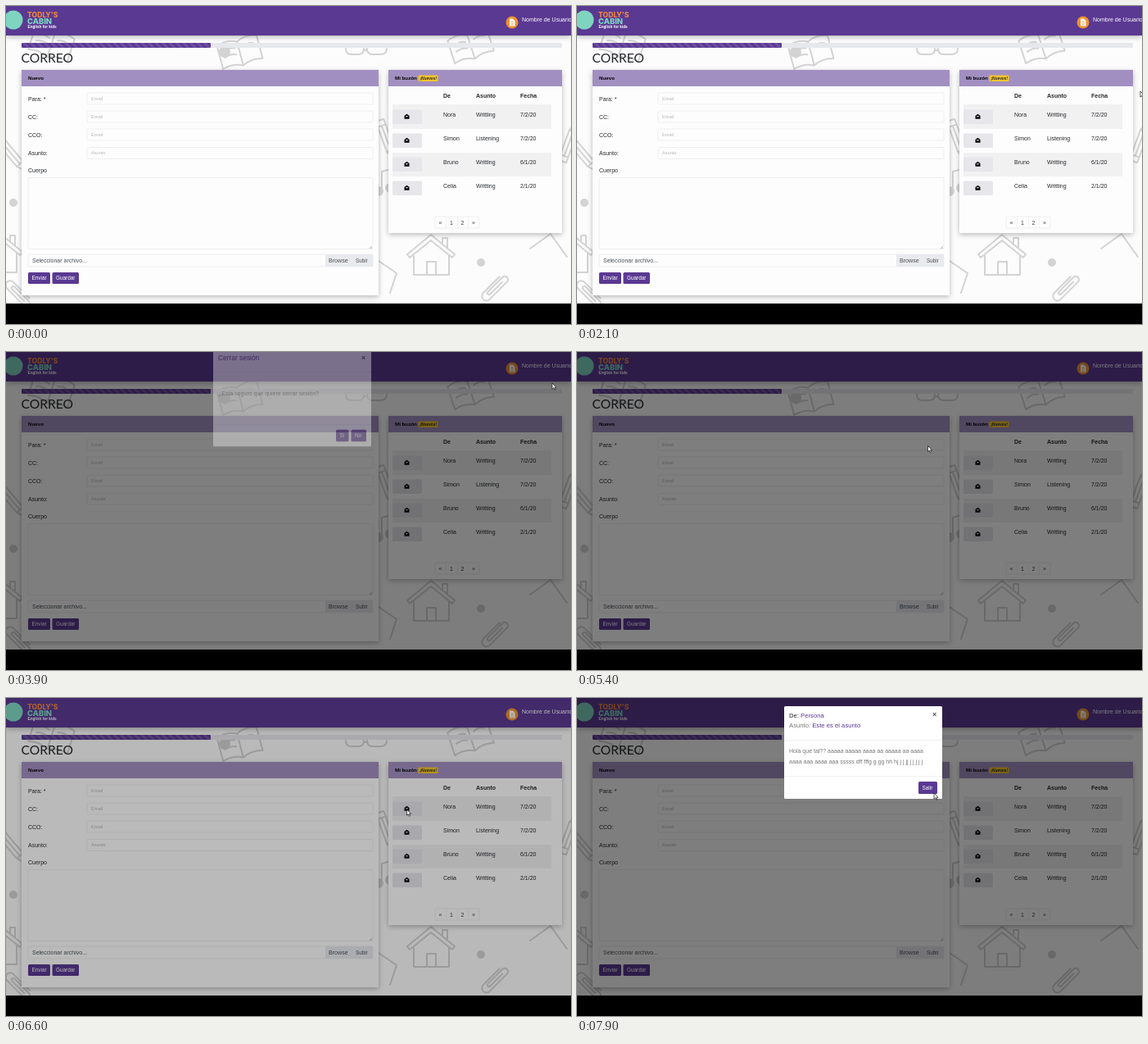
Write an HTML page that moves like this. It is 690x388 px and loops after 8 s.

```html
<!DOCTYPE html>
<html lang="es">
<head>
<meta charset="utf-8">
<title>Correo</title>
<style>
  html, body { margin: 0; width: 100%; height: 100%; overflow: hidden; background: #000; }
  svg { display: block; width: 690px; height: 388px; }
  text { font-family: "Liberation Sans", Arial, sans-serif; white-space: pre; }
  .b { font-weight: bold; }
  .i { font-weight: bold; font-style: italic; }
  .title { font-family: Lato, sans-serif; }
  .brand { font-family: Inter, sans-serif; font-weight: 800; }
  .card { filter: drop-shadow(0 2px 3px #0004); }
  .doodle { fill: none; stroke: #d3d3d3; stroke-width: 2; stroke-linejoin: round; stroke-linecap: round; }
</style>
</head>
<body>
<svg id="stage" viewBox="0 0 690 388"></svg>
<script>
const PURPLE = '#5a3992', INK = '#25282c';

// Text is placed by its left edge and vertical middle.
const text = (x, y, s, size = 7, fill = INK, cls = '') =>
  `<text x="${x}" y="${y + size * .36}" font-size="${size}" fill="${fill}" class="${cls}">${s}</text>`;
const box = (x, y, w, h, fill, extra = '') =>
  `<rect x="${x}" y="${y}" width="${w}" height="${h}" fill="${fill}" ${extra}/>`;
const button = (x, y, w, h, s, pad = 4.5) =>
  box(x, y, w, h, PURPLE, 'rx="1.5"') + text(x + pad, y + h / 2, s, 6.4, '#fff');
const field = (x, y, w, h) => box(x, y, w, h, '#fdfdfd', 'stroke="#e9e9ec" stroke-width=".7" rx="1"');
const dot = (x, y, r, fill) => `<circle cx="${x}" cy="${y}" r="${r}" fill="${fill}"/>`;
const line = (x, y, w) => box(x, y, w, .6, '#e3e5e8');

const house = (x, y) => `<g transform="translate(${x} ${y})">
  <path d="M-29 0L0-24 29 0 26 4 0-17-26 4ZM-21 2V25H22V2M-5 25V9H6V25M14-12V-20H20V-7"/></g>`;
const book = (x, y, turn) => `<g transform="translate(${x} ${y}) rotate(${turn})">
  <path d="M-25-16Q-12-21 0-15 12-21 25-16V13Q12 9 0 15-12 9-25 13ZM0-15V15M-19-8Q-11-11-5-8M6-8Q13-11 19-8M-19 0Q-11-3-5 0"/></g>`;
const pencil = (x, y, turn) => `<g transform="translate(${x} ${y}) rotate(${turn})">
  <path d="M-25-5H14L26 0 14 5H-25ZM-18-5V5M14-5V5M-18 0H14"/></g>`;
const clip = (x, y, turn) => `<g transform="translate(${x} ${y}) rotate(${turn})">
  <path d="M13-5H-15A5 5 0 0 0-15 6H15A4 4 0 0 0 15-2H-10A2 2 0 0 0-10 2H11"/></g>`;
const note = (x, y) => `<path d="M${x} ${y}V${y - 24}L${x + 14} ${y - 28}V${y - 4}"/>` +
  dot(x - 4, y, 5, '#d3d3d3') + dot(x + 10, y - 4, 5, '#d3d3d3');

const doodles = `<g class="doodle">
  ${house(519, 303)}${house(-9, 300)}
  ${book(286, 58, -15)}${book(568, 50, -18)}${book(55, 48, 18)}
  ${pencil(505, 252, 60)}${pencil(688, 166, -70)}${pencil(8, 182, 50)}${pencil(465, 163, 70)}
  ${clip(597, 343, -45)}${clip(16, 351, 45)}
  ${note(459, 226)}
  <path d="M415 52q0 7 7 7h8q7 0 7-7M441 52q0 7 7 7h9q8 0 8-7M437 54h4M640 296l25-18 20 28M455 311l22 15-8 24"/>
  ${dot(580, 313, 4, '#d3d3d3')}${dot(9, 240, 4, '#d3d3d3')}${dot(267, 56, 6, '#d3d3d3')}</g>`;

const navbar = box(0, 0, 690, 36, PURPLE, 'class="card"') +
  dot(9, 17, 11.5, '#7fd4bf') +
  text(26, 10.5, "TODLY'S", 8.6, '#f0863a', 'brand') +
  text(26, 18.5, 'CABIN', 9.4, '#7fd9c4', 'brand') +
  text(26.5, 25.7, 'English for kids', 4.7, '#fff', 'b') +
  dot(618, 20, 7.5, '#ef9130') +
  '<path d="M615 15.5h4l2.5 2.5v6.5H615Z" fill="#fff"/><path d="M616.5 19h3.5M616.5 21h3.5M616.5 23h3.5" stroke="#ef9130" stroke-width=".7"/>' +
  text(630, 16.5, 'Nombre de Usuario', 7, '#fff');

const progress = box(19, 45, 660, 6, '#e7e8eb', 'rx="1"') +
  box(19, 45, 231, 6, 'url(#stripes)', 'rx="1"');

const labels = [['Para: *', 113, 'Email'], ['CC:', 135, 'Email'], ['CCO:', 157, 'Email'], ['Asunto:', 179.5, 'Asunto']];
const mailForm = `<g class="card">${box(19, 78, 436, 275, '#fdfdfd')}</g>` +
  box(19, 78, 436, 20, '#a28fc1') + text(27, 88, 'Nuevo', 6.2, '#000', 'b') +
  labels.map(([name, y, hint]) => text(27, y, name) + field(99, y - 7, 349, 14) +
    text(104, y - .3, hint, 5.6, '#b3b6ba')).join('') +
  text(27, 200, 'Cuerpo') + field(27, 209.5, 421, 87) +
  '<path d="M444 296l3-3M446 296l1-1" stroke="#888" stroke-width=".6"/>' +
  field(27, 303, 421, 15) + box(390, 303, 58, 15, '#e9eaee') +
  text(32, 310.5, 'Seleccionar archivo...', 7, '#495057') +
  text(394, 310.5, 'Browse', 7.1, '#495057') + text(427, 310.5, 'Subir', 6.3, '#495057') +
  button(27, 325, 27, 14, 'Enviar') + button(56.5, 325, 32.5, 14, 'Guardar');

const mails = [['Nora', 'Writting', '7/2/20'], ['Simon', 'Listening', '7/2/20'],
  ['Bruno', 'Writting', '6/1/20'], ['Celia', 'Writting', '2/1/20']];
const columns = [534, 574, 628];
const envelope = y => `<path d="M486.500 ${y - 1}l3-2.300 3 2.300v3.800h-6Z" fill="#000"/>
  <path d="M487.500 ${y - .8}h4l-2 1.500Z" fill="#fff"/>`;
const inbox = `<g class="card">${box(467, 78, 212, 199, '#fdfdfd')}</g>` +
  box(467, 78, 212, 20, '#a28fc1') + text(475, 88, 'Mi buzón', 6.2, '#000', 'b') +
  box(503.5, 84.5, 24, 7.5, '#f5c52c', 'rx="1"') + text(505.5, 88.3, '¡Nuevos!', 4.8, INK, 'i') +
  ['De', 'Asunto', 'Fecha'].map((s, i) => text(columns[i], 109.5, s, 7, INK, 'b')).join('') +
  line(472, 120.5, 194) +
  mails.map((mail, i) => {
    const y = 132 + i * 29;
    return (i % 2 ? '' : box(472, y - 11, 194, 29, '#f1f1f2')) +
      box(472, y - 5.5, 36, 17.5, '#e6e6eb', 'rx="1.5"') + envelope(y + 3) +
      mail.map((s, j) => text(columns[j], y, s)).join('');
  }).join('') +
  field(524, 257, 54, 14) +
  [['«', 528.5], ['1', 542], ['2', 555.5], ['»', 569]].map(([s, x]) => text(x, 264, s, 7, '#444')).join('') +
  [537, 551, 564].map(x => box(x, 257, .6, 14, '#ececee')).join('');

const frame = h => box(253, 10, 193, h, '#fff', 'rx="1.5"') + text(434, 20, '×', 9, '#555', 'b');
const logoutModal = frame(119) + text(259, 20.7, 'Cerrar sesión', 8.4, PURPLE) + line(253, 38, 193) +
  text(259, 64, '¿Está seguro que quiere cerrar sesión?', 7, '#777') + line(253, 102, 193) +
  button(403, 108.5, 15.5, 14.5, 'Si') + button(421.5, 108.5, 18.5, 14.5, 'No');
const mailModal = frame(113) + text(259, 21.5, `De: <tspan fill="${PURPLE}">Persona</tspan>`, 7.7) +
  text(259, 33.5, `Asunto: <tspan fill="${PURPLE}">Este es el asunto</tspan>`, 7.7, '#777') + line(253, 51, 193) +
  text(259, 64.5, 'Hola que tal?? aaaaa aaaaa aaaa aa aaaaa aa aaaa', 7, '#777') +
  text(259, 77, 'aaaa aaa aaaa aaa sssss dff fffg g gg hh hj j j jj j j j j j', 7, '#777') +
  line(253, 95.5, 193) + button(417, 102, 23, 15, 'Salir');

stage.innerHTML = `<defs>
  <pattern id="stripes" width="6" height="6" patternUnits="userSpaceOnUse" patternTransform="rotate(-45)">
    ${box(0, 0, 6, 6, PURPLE)}${box(0, 0, 3, 6, '#6d50a0')}</pattern>
  <clipPath id="page">${box(0, 0, 690, 363, '#fff')}</clipPath></defs>
  ${box(0, 0, 690, 388, '#000')}
  <g clip-path="url(#page)">${box(0, 0, 690, 363, '#fcfcfc')}${doodles}${navbar}${progress}
    ${text(18.5, 63, 'CORREO', 15.6, INK, 'title')}${mailForm}${inbox}
    ${box(0, 0, 690, 363, '#000', 'id="dim"')}
    <g id="logout">${logoutModal}</g><g id="mail">${mailModal}</g>
    <path id="pointer" d="M0 0V7.200L1.700 5.700 2.900 8.200 4 7.700 2.900 5.300H5Z" fill="#fff" stroke="#111" stroke-width=".7"/>
  </g>`;

const ramp = (t, start, length) => Math.min(1, Math.max(0, (t - start) / length));
const easeOut = p => 1 - (1 - p) ** 1.7;
const smooth = p => p * p * (3 - 2 * p);

// Each move: start, duration, destination.
const moves = [[2100, 1400, 667, 38], [4100, 1000, 428.5, 114.5], [5600, 900, 489.5, 136], [6950, 800, 436, 116]];

function placePointer(t) {
  let x = 688, y = 104;
  for (const [start, length, toX, toY] of moves) {
    const p = smooth(ramp(t, start, length));
    x += (toX - x) * p;
    y += (toY - y) * p;
  }
  pointer.setAttribute('transform', `translate(${x} ${y})`);
  pointer.setAttribute('opacity', t < 2000 ? 0 : 1);
}

function placeModal(node, t, opened, closed = Infinity) {
  const shift = 1 - easeOut(ramp(t, opened, 300)) + easeOut(ramp(t, closed, 300));
  node.setAttribute('transform', `translate(0 ${-19.3 * shift})`);
  node.setAttribute('opacity', ramp(t, opened, 150) - ramp(t, closed, 150));
}

function draw(now) {
  const t = Math.floor(now % 8000 / 100) * 100;
  dim.setAttribute('opacity', .5 * (ramp(t, 3695, 150) - ramp(t, 5410, 150) + ramp(t, 6520, 150)));
  placeModal(logout, t, 3845, 5230);
  placeModal(mail, t, 6670);
  placePointer(t);
}

const begin = performance.now();
function tick() {
  draw(performance.now() - begin);
  requestAnimationFrame(tick);
}
tick();
</script>
</body>
</html>
```
